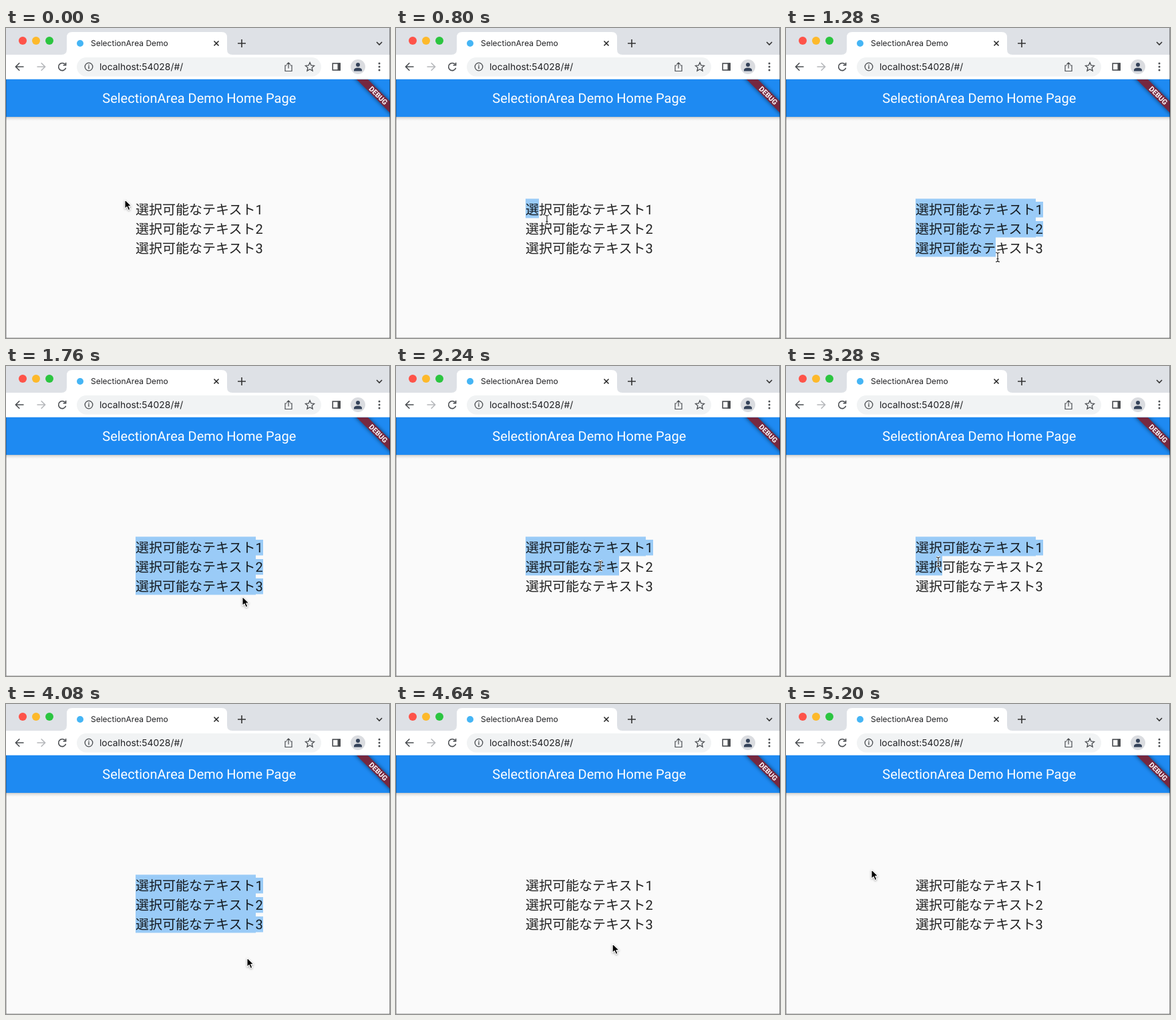
An HTML page for the animation above (5.28 s loop, 575 by 464 pixels).

```html
<!DOCTYPE html>
<html lang="ja">
<head>
<meta charset="utf-8">
<title>SelectionArea Demo</title>
<style>
  html, body { margin: 0; width: 100%; height: 100%; overflow: hidden; background: #fafafa; }
  svg { display: block; width: 575px; height: 464px; text-rendering: geometricPrecision; }
  .ui { font-family: Inter, Roboto, sans-serif; fill: #202124; }
  .bar { font: 20px Roboto, sans-serif; fill: #fff; }
  .line { font: 20px Roboto, "Noto Sans CJK JP", "Noto Sans CJK", sans-serif; fill: #000; fill-opacity: .87; }
  .icon { fill: none; stroke: #4a4d51; stroke-width: 1.6; }
  .ribbon { filter: drop-shadow(0 0 3px rgba(0, 0, 0, .6)); }
  .shade { filter: drop-shadow(0 1px 1.5px rgba(0, 0, 0, .35)); }
</style>
</head>
<body>
<svg viewBox="0 0 575 464">
  <defs>
    <linearGradient id="drop" x2="0" y2="1">
      <stop offset="0" stop-opacity=".2"/>
      <stop offset=".4" stop-opacity=".08"/>
      <stop offset="1" stop-opacity="0"/>
    </linearGradient>
    <clipPath id="app"><rect y="77" width="575" height="387"/></clipPath>
    <clipPath id="face"><circle cx="527" cy="58" r="11"/></clipPath>
  </defs>

  <!-- tab strip -->
  <rect width="575" height="41" fill="#dee1e6"/>
  <path d="M83 40q8 0 8-8V14q0-8 8-8H323q8 0 8 8V32q0 8 8 8z" fill="#fff"/>
  <circle cx="25" cy="19" r="6" fill="#fe5349"/>
  <circle cx="45" cy="19" r="6" fill="#fdb92b"/>
  <circle cx="65" cy="19" r="6" fill="#2bc540"/>
  <circle cx="111" cy="23" r="5" fill="#45b5f5"/>
  <text class="ui" x="127" y="27.400" font-size="12">SelectionArea Demo</text>
  <g class="icon">
    <path d="M311.500 19.500l7 7m0-7l-7 7" stroke="#222" stroke-width="1.500"/>
    <path d="M347 23h12m-6-6v12" stroke="#333"/>
    <path d="M555 21l4 4 4-4" stroke="#333"/>
  </g>

  <!-- toolbar -->
  <rect y="40" width="575" height="37" fill="#fff"/>
  <rect x="106" y="44" width="366" height="28.500" rx="14.250" fill="#f1f3f4"/>
  <g class="icon">
    <path d="M26.500 58H14.500m5.800-5.800L14.500 58l5.800 5.800"/>
    <path d="M46.500 58h12m-5.800-5.800l5.800 5.800-5.800 5.800" stroke="#b6b8bb"/>
    <path d="M88.600 54.500a5.600 5.600 0 1 0 1 5.200M89.600 51.800v4h-4"/>
    <circle cx="124" cy="58" r="5.800" stroke-width="1.300"/>
    <path d="M124 57v4.200m0-6.400v1.400" stroke-width="1.400"/>
    <path d="M420.500 56H418v8.500h10V56h-2.500M423 60.500v-8.500m-2.800 2.600L423 51.800l2.800 2.800" stroke-width="1.200"/>
    <path d="M455 51.600l1.900 4.300 4.700.5-3.500 3.100 1 4.600-4.100-2.400-4.100 2.400 1-4.600-3.500-3.100 4.700-.5z" stroke-width="1.300"/>
    <rect x="489.200" y="53" width="11" height="10"/>
    <path d="M498.500 52.500v11" stroke-width="4"/>
  </g>
  <circle cx="527" cy="58" r="11" fill="#dadce0"/>
  <g clip-path="url(#face)" fill="#35435a">
    <circle cx="527" cy="55" r="3"/>
    <path d="M521 64.500v-1.500q0-3.500 6-3.500t6 3.500v1.500z"/>
  </g>
  <g fill="#4a4d51">
    <circle cx="559" cy="53" r="1.500"/>
    <circle cx="559" cy="58" r="1.500"/>
    <circle cx="559" cy="63" r="1.500"/>
  </g>
  <text class="ui" x="140" y="63" font-size="13.900">localhost:54028/#/</text>

  <!-- app -->
  <rect y="77" width="575" height="387" fill="#fafafa"/>
  <rect y="133" width="575" height="6" fill="url(#drop)"/>
  <rect y="76.700" width="575" height="56.300" fill="#1e8af2"/>
  <text class="bar" x="289.250" y="112.400" text-anchor="middle">SelectionArea Demo Home Page</text>
  <g clip-path="url(#app)">
    <g transform="translate(557.500 101) rotate(45)">
      <rect class="ribbon" x="-50" y="-6" width="100" height="12" fill="#762840"/>
      <text y="3.800" text-anchor="middle" font-family="Roboto, sans-serif" font-size="10.600" font-weight="700" fill="#fff">DEBUG</text>
    </g>
  </g>
  <path id="sel" fill="#9acbf7"/>
  <g id="lines"></g>
  <path d="M.5 77V464" stroke="#000" stroke-opacity=".25"/>
  <path d="M574.500 0V464" stroke="#000" stroke-opacity=".4"/>
  <path d="M0 463.500H575" stroke="#000" stroke-opacity=".2"/>

  <!-- pointers -->
  <g id="arrow" class="shade">
    <path transform="scale(.94)" d="M0 0V14.200L3.300 11.200 5.600 16.600 8.300 15.500 6 10.200H10.500z" fill="#000" stroke="#fff" stroke-width="1.100" stroke-linejoin="round"/>
  </g>
  <g id="beam" fill="none">
    <path id="stem" d="M-3-7Q0-7 0-5Q0-7 3-7M0-5V5M-3 7Q0 7 0 5Q0 7 3 7M-1.500 2.500H1.500" stroke="#fff" stroke-width="2.800"/>
    <path d="M-3-7Q0-7 0-5Q0-7 3-7M0-5V5M-3 7Q0 7 0 5Q0 7 3 7M-1.500 2.500H1.500" stroke="#222" stroke-width="1.100"/>
  </g>
</svg>
<script>
  const LOOP = 5280, STEP = 80;
  const LEFT = 194, TOP = 255.5, EM = 20, ROW = 29, CHARS = 10, ROWS = 3;
  const DRAG = 480, CLEAR = 4640;

  // time, x, y
  const path = [
    [0, 178, 257], [320, 195, 268], [480, 197, 270], [800, 226, 287],
    [960, 275, 322], [1280, 317, 343], [1520, 352, 352], [1680, 356, 354],
    [1920, 350, 328], [2160, 326, 303], [2240, 306, 299], [2640, 258, 301],
    [3120, 232, 295], [3280, 228, 293], [3600, 300, 345], [3840, 358, 378],
    [4080, 361, 380], [4560, 361, 380], [5040, 140, 253], [5200, 128, 248]
  ];
  const $ = id => document.getElementById(id);
  const clamp = (v, lo, hi) => Math.min(hi, Math.max(lo, v));

  for (let i = 0; i < ROWS; i++) {
    const t = document.createElementNS("http://www.w3.org/2000/svg", "text");
    t.setAttribute("class", "line");
    t.setAttribute("x", LEFT);
    t.setAttribute("y", 278.5 + i * ROW);
    t.textContent = "選択可能なテキスト" + (i + 1);
    $("lines").append(t);
  }

  function pointAt(t) {
    const i = path.findIndex(p => p[0] > t);
    if (i < 0) return path[path.length - 1].slice(1);
    const [a, b] = [path[i - 1], path[i]];
    const k = (t - a[0]) / (b[0] - a[0]);
    return [a[1] + (b[1] - a[1]) * k, a[2] + (b[2] - a[2]) * k];
  }

  const box = (x, y, w, h) => `M${x} ${y}h${w}v${h}h${-w}z`;

  // The selection trails the pointer by one step.
  function selection(t) {
    if (t < DRAG || t >= CLEAR) return "";
    const [x, y] = pointAt(t - STEP);
    const row = Math.floor((y - TOP) / ROW);
    let d = "";
    for (let i = 0; i < ROWS; i++) {
      const n = i < row ? CHARS : i > row ? 0 : clamp(Math.round((x - LEFT) / EM), 0, CHARS);
      const top = TOP + i * ROW;
      if (n) d += box(LEFT, top, Math.min(n, CHARS - 1) * EM, ROW);
      if (n === CHARS) d += box(LEFT + 180, top + 4.5, 11, 23.5);
    }
    return d;
  }

  function draw(now) {
    const t = Math.floor((now % LOOP) / STEP) * STEP;
    const [x, y] = pointAt(t);
    const overText = x >= LEFT && x <= 385 && y >= 256 && y <= 345;
    $("sel").setAttribute("d", selection(t));
    for (const [id, on] of [["arrow", !overText], ["beam", overText]]) {
      $(id).setAttribute("transform", `translate(${x} ${y})`);
      $(id).style.display = on ? "" : "none";
    }
  }

  const start = performance.now();
  function tick() {
    draw(performance.now() - start);
    requestAnimationFrame(tick);
  }
  tick();
</script>
</body>
</html>
```
